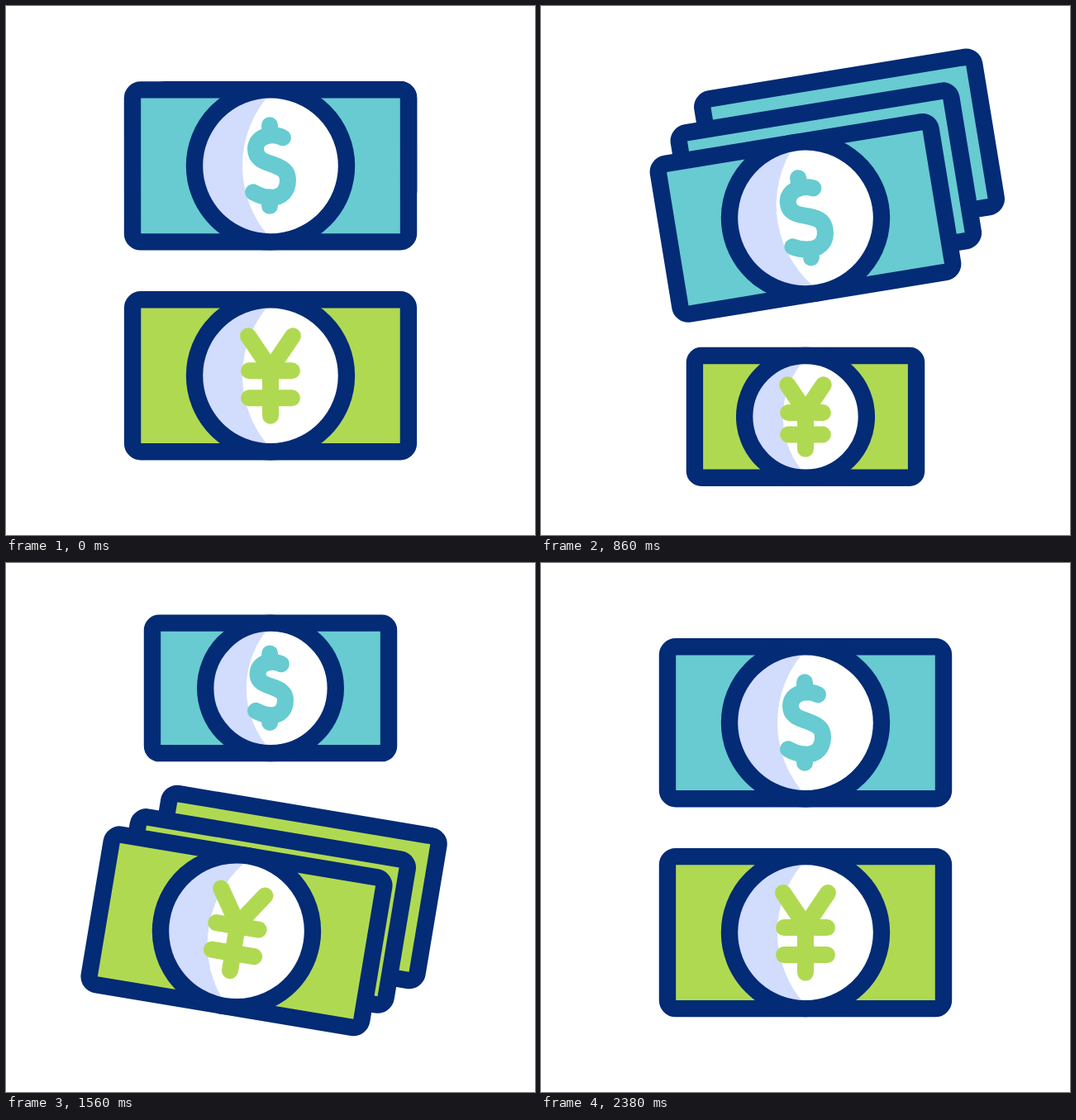
These frames come from a looping animation (640x640 px, 2.4 s). An HTML page:

```html
<!DOCTYPE html>
<html lang="en">
<head>
<meta charset="utf-8">
<title>Banknotes</title>
<style>
  html, body { margin: 0; width: 100%; height: 100%; overflow: hidden; background: #fff; }
  svg { display: block; width: 640px; height: 640px; }
  svg * { vector-effect: non-scaling-stroke; }
  .line { stroke: #032b76; stroke-width: 20.4; }
  .sign { fill: none; stroke-width: 20; stroke-linecap: round; stroke-linejoin: round; }
</style>
</head>
<body>
<svg id="stage" viewBox="0 0 640 640"></svg>
<script>
const LOOP = 2400;
const HALF_W = 167, HALF_H = 92;

// Edge offsets of the hidden notes: [start, change] for left, top, right, bottom
const notes = [
  {
    x: 320, y: 193.2, color: '#67cbd1',
    sign: 'M15-34C3-40-18-37-18-20C-18-8-7-5 2-2C12 2 21 5 21 17C21 30 14 38.5 0 38.5C-8 38-13 36.5-21 32M-1-49V-40M-1 48.5V38',
    angle: -9.7, dx: 0, dy: 66, shrink: 0.182, away: -53,
    open: [0, 480, 1.1], close: [844, 1240, 1],
    backs: [
      [[30, 37], [0, -72], [0, 67.5], [-52, -18]],
      [[1, 31], [28.2, -64], [-26, 59], [-27.5, -6]]
    ]
  },
  {
    x: 320, y: 447.1, color: '#b0d952',
    sign: 'M-27-48L0-8L27-48M0-8V48.5M-26-6H26M-26 27H26',
    angle: 12, dx: -52, dy: -2.3, shrink: 0.206, away: 52,
    open: [1240, 1700, 1.3], close: [2040, 2380, 1.15],
    backs: [
      [[32, 36], [0, -76.5], [0, 72.3], [-46, -27]],
      [[3, 32], [29, -70], [-20.5, 57], [-22.5, -12]]
    ]
  }
];

const stage = document.getElementById('stage');

function add(parent, tag, attrs) {
  const el = document.createElementNS('http://www.w3.org/2000/svg', tag);
  set(el, attrs);
  return parent.appendChild(el);
}

function set(el, attrs) {
  for (const key in attrs) el.setAttribute(key, attrs[key]);
}

function addRect(parent, fill) {
  return add(parent, 'rect', {
    class: 'line', fill, rx: 10,
    x: -HALF_W, y: -HALF_H, width: 2 * HALF_W, height: 2 * HALF_H
  });
}

function build(note) {
  note.group = add(stage, 'g', {});
  note.rects = note.backs.map(() => addRect(note.group, note.color));
  addRect(note.group, note.color);
  add(note.group, 'circle', { r: 92, fill: '#d2dcfd' });
  add(note.group, 'path', { d: 'M4-91.9A130 130 0 0 0 4 91.9A92 92 0 0 0 4-91.9Z', fill: '#fff' });
  add(note.group, 'circle', { r: 92, fill: 'none', class: 'line' });
  add(note.group, 'path', { d: note.sign, class: 'sign', stroke: note.color });
}

function ease(t, [from, to, power]) {
  const u = Math.min(1, Math.max(0, (t - from) / (to - from)));
  return 1 - Math.pow(1 - u, power);
}

function spread(note, t) {
  return ease(t, note.open) - ease(t, note.close);
}

function pose(note, own, other) {
  const x = note.x + note.dx * own;
  const y = note.y + note.dy * own + note.away * other;
  const scale = 1 - note.shrink * other;
  set(note.group, {
    transform: `translate(${x} ${y}) rotate(${note.angle * own}) scale(${scale})`
  });
  note.rects.forEach((rect, i) => {
    const [left, top, right, bottom] = note.backs[i].map(([start, change]) => start + change * own);
    set(rect, {
      x: left - HALF_W,
      y: top - HALF_H,
      width: 2 * HALF_W + right - left,
      height: 2 * HALF_H + bottom - top,
      visibility: own > 0 ? 'visible' : 'hidden'
    });
  });
}

function draw(t) {
  const [a, b] = notes.map(note => spread(note, t));
  pose(notes[0], a, b);
  pose(notes[1], b, a);
}

notes.forEach(build);
draw(0);

const began = performance.now();
function tick() {
  draw((performance.now() - began) % LOOP);
  requestAnimationFrame(tick);
}
requestAnimationFrame(tick);
</script>
</body>
</html>
```
